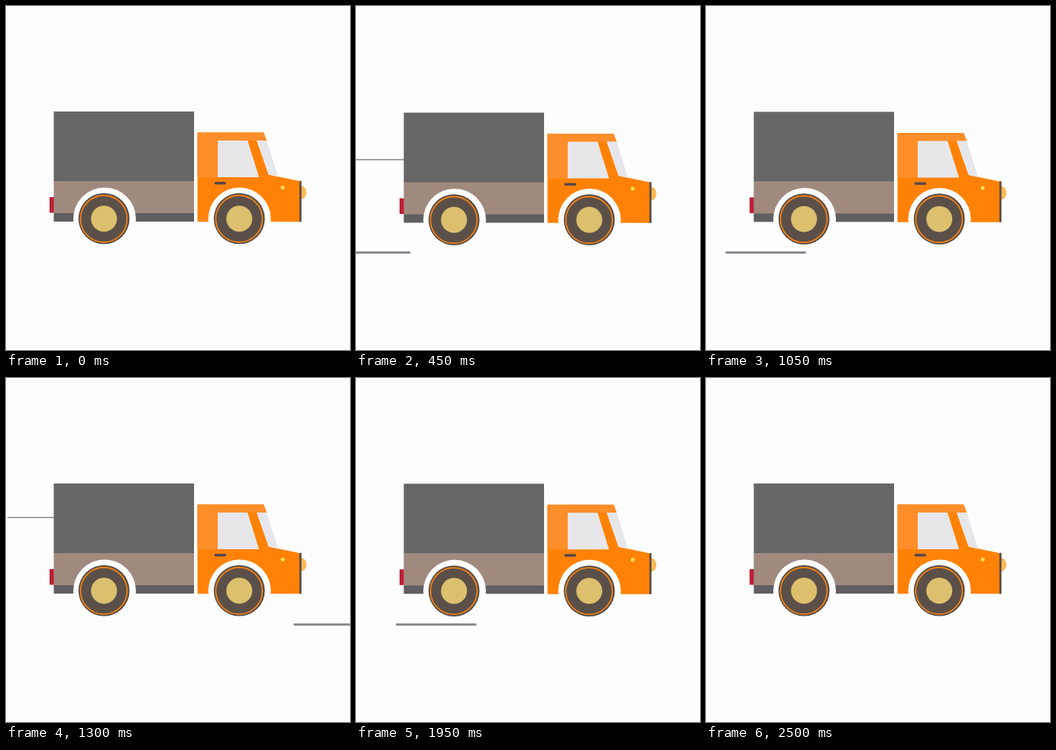
An HTML page for the animation above (2.55 s loop, 450 by 450 pixels).

```html
<!DOCTYPE html>
<html lang="en">
<head>
<meta charset="utf-8">
<title>Truck</title>
<style>
  html, body { margin: 0; width: 100%; height: 100%; overflow: hidden; background: #fdfdfd; }
  svg { display: block; width: 100vw; height: 100vh; }
</style>
</head>
<body>
<svg viewBox="0 0 450 450">
  <defs>
    <g id="wheel">
      <circle r="33.4" fill="#5b5049"/>
      <circle cx="-.3" cy=".2" r="30.5" fill="none" stroke="#fb8512" stroke-width="1.6"/>
      <circle r="17" fill="#dcc06e"/>
    </g>
  </defs>
  <g id="lines" stroke-linecap="round"></g>
  <g id="truck">
    <rect x="57" y="250" width="6" height="20.5" fill="#bd2036"/>
    <rect x="62.5" y="138" width="183.5" height="91.5" fill="#666667"/>
    <rect x="62.5" y="229" width="183.5" height="42.5" fill="#a08a7f"/>
    <rect x="62.5" y="271" width="183.5" height="11" fill="#605e60"/>
    <path d="M386 235a7 9 0 0 1 0 18z" fill="#fcba55"/>
    <path d="M250.5 165.5H337L341 176H328L343.5 220.5 386 229.500V282.300H250.500z" fill="#ff8206"/>
    <path d="M250.500 165.500H337L341 176H277V224H250.500z" fill="#fd8e2a"/>
    <path d="M277 176H316L331 224H277z" fill="#e7e7ea"/>
    <path d="M328 176H341L356 223.500 343.500 220.500z" fill="#e6e7eb"/>
    <rect x="272.500" y="230" width="15.500" height="3.500" rx="1.700" fill="#57484a"/>
    <circle cx="362" cy="237.500" r="2.500" fill="#fee05c"/>
    <rect x="383.800" y="228.800" width="2.700" height="53.500" fill="#564b47"/>
    <circle cx="129" cy="278.500" r="41" fill="#fdfdfd"/>
    <circle cx="305.500" cy="278.500" r="41" fill="#fdfdfd"/>
    <use href="#wheel" x="128.200" y="278.200"/>
    <use href="#wheel" x="305.200" y="278.200"/>
  </g>
</svg>
<script>
const LOOP = 2550;
const truck = document.getElementById('truck');
const lines = document.getElementById('lines');

// Suspension: [time, vertical offset]
const bumps = [[0, 0], [450, 1.5], [750, 1], [1300, 0], [1650, .5], [2200, .2], [2550, 0]];

function makeLine(start, y, from, length, speed, width, color) {
  const el = document.createElementNS('http://www.w3.org/2000/svg', 'path');
  el.setAttribute('stroke', color);
  el.setAttribute('stroke-width', width);
  lines.append(el);
  return { el, start, y, from, length, speed };
}

const road = [69, 716, 1242, 1637, 2010]
  .map(start => makeLine(start, 322.5, 452.5, 103, 1.271, 2.8, '#8d8c94'));
const wind = [[340, 201], [748, 182.5], [1200, 182.5], [1550, 211], [2198, 182.5]]
  .map(([start, y]) => makeLine(start, y, 63, 75, .6, 1.6, '#85858a'));

function bump(t) {
  const i = bumps.findIndex(p => p[0] > t);
  const [t0, y0] = bumps[i - 1], [t1, y1] = bumps[i];
  const k = (t - t0) / (t1 - t0);
  return y0 + (y1 - y0) * k * k * (3 - 2 * k);
}

function draw(t) {
  truck.setAttribute('transform', `translate(0 ${bump(t)})`);
  for (const { el, start, y, from, length, speed } of [...road, ...wind]) {
    const x = from - (t - start) * speed;
    const shown = t >= start && x + length > -3;
    el.setAttribute('visibility', shown ? 'visible' : 'hidden');
    // Never reach past the point where the line emerges, plus a margin.
    el.setAttribute('d', `M${x} ${y}H${Math.min(x + length, from + 20)}`);
  }
}

const begin = performance.now();
function tick() {
  draw((performance.now() - begin) % LOOP);
  requestAnimationFrame(tick);
}
tick();
</script>
</body>
</html>
```
